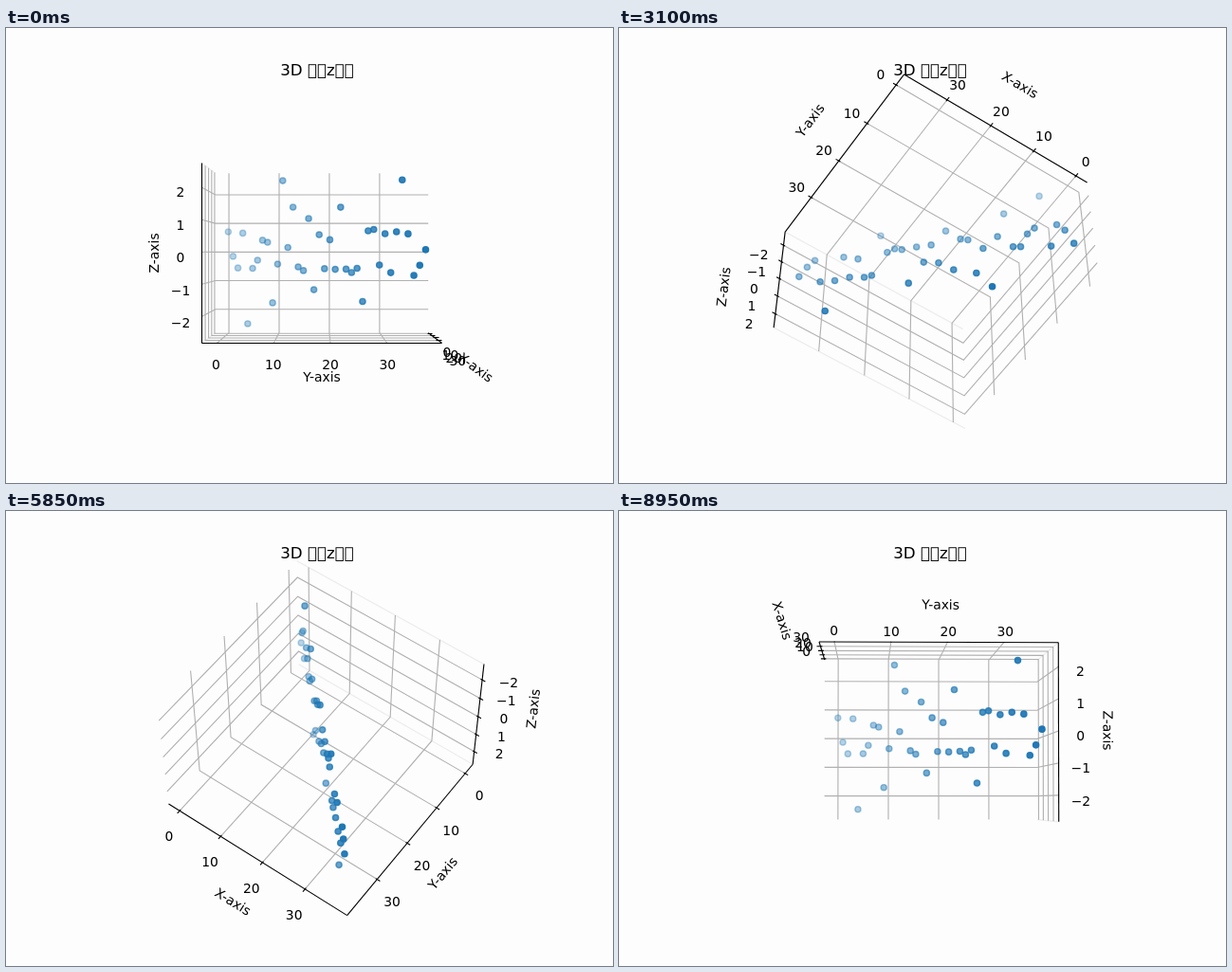
These frames come from a looping animation (640 px wide and 480 px high, 9000 ms). An HTML page with a canvas:

```html
<!DOCTYPE html>
<html lang="en">
<head>
<meta charset="utf-8">
<title>Rotating 3D scatter</title>
<style>
  html, body { margin: 0; width: 100%; height: 100%; overflow: hidden; background: #fdfdfd; }
  canvas { display: block; }
</style>
</head>
<body>
<canvas id="stage" width="640" height="480"></canvas>
<script>
const ctx = document.getElementById('stage').getContext('2d');

const FRAME_MS = 50, FRAMES = 180, STEP_DEG = 2;
const POINT = 100 / 72;                         // pixels per typographic point
const DISTANCE = 10, SCALE = 369.6 / 0.185;     // camera distance, pixels per projected unit
const ORIGIN = [333, 237.4];

const scores = [
  0.70, -0.15, -0.55, 0.65, -2.46, -0.56, -0.28, 0.40, 0.33, -1.72,
  -0.41, 2.40, 0.15, 1.50, -0.50, -0.62, 1.11, -1.25, 0.57, -0.55,
  0.40, -0.57, 1.46, -0.56, -0.67, -0.53, -1.60, 0.68, 0.72, -0.42,
  0.58, -0.66, 0.64, 2.28, 0.57, -0.74, -0.42, 0.07
];

// The box is centred on the world origin; half holds its half sizes.
const half = [4, 4, 3].map(side => side * 0.148813);
const delta = half.map(size => size * 0.16);
const dataCentre = [18.5, 18.5, -0.0355];
const dataHalf = [21.198, 21.198, 2.788];
const toWorld = (value, axis) => (value - dataCentre[axis]) / dataHalf[axis] * half[axis];

const axes = [
  { name: 'X-axis', ticks: [0, 10, 20, 30], side: 1 },
  { name: 'Y-axis', ticks: [0, 10, 20, 30], side: 0 },
  { name: 'Z-axis', ticks: [-2, -1, 0, 1, 2], side: 0 }
];
const points = scores.map((z, i) => [i, i, z].map(toWorld));

const dot = (a, b) => a[0] * b[0] + a[1] * b[1] + a[2] * b[2];
const replaced = (point, axis, value) => point.map((c, i) => i === axis ? value : c);
const pushedOut = (point, axis, amount) =>
  point.map((c, i) => i === axis ? c : c + (c < 0 ? -1 : 1) * amount * delta[i]);

function makeCamera(degrees) {
  const angle = degrees * Math.PI / 180;
  const s = Math.sin(angle), c = Math.cos(angle);   // elevation equals azimuth
  const right = [-s, c, 0], up = [-s * c, -s * s, c], toEye = [c * c, c * s, s];
  const project = p => {
    const depth = DISTANCE - dot(toEye, p);
    return [
      ORIGIN[0] + dot(right, p) / depth * SCALE,
      ORIGIN[1] - dot(up, p) / depth * SCALE,
      depth
    ];
  };
  const fromPole = Math.abs(c) < 1e-9;
  const highs = toEye.map((w, i) => fromPole && i < 2 ? true : w < -1e-9);
  return { project, highs };
}

function drawLine(path, color, width) {
  if (path.length === 2) {
    // Crisp pixels for straight horizontal and vertical lines.
    const [a, b] = path;
    if (Math.abs(a[0] - b[0]) < 0.01 || Math.abs(a[1] - b[1]) < 0.01) {
      path = path.map(p => [Math.floor(p[0]) + 0.5, Math.floor(p[1]) + 0.5]);
    }
  }
  ctx.beginPath();
  path.forEach(p => ctx.lineTo(p[0], p[1]));
  ctx.strokeStyle = color;
  ctx.lineWidth = width * POINT;
  ctx.stroke();
}

function drawText(text, x, y, baseline, angle = 0) {
  ctx.save();
  ctx.translate(x, y);
  ctx.rotate(angle);
  ctx.fillText(text, 0, baseline);
  ctx.restore();
}

function setFont(size) {
  ctx.font = `${size * POINT}px "DejaVu Sans", sans-serif`;
  ctx.fillStyle = '#000';
}

function drawTitle() {
  const em = 12 * POINT, left = 289.2, base = 50;
  setFont(12);
  ctx.textAlign = 'left';
  ctx.fillText('3D', left, base);
  ctx.fillText('z', left + 2.924 * em, base);
  ctx.strokeStyle = '#000';
  ctx.lineWidth = 0.056 * em;
  for (const x of [1.724, 2.324, 3.449, 4.049]) {   // missing-glyph boxes
    ctx.strokeRect(left + (x + 0.078) * em, base - 0.677 * em, 0.444 * em, 0.826 * em);
  }
}

function drawAxis(index, far, near, { project, highs }) {
  const { name, ticks, side } = axes[index];
  const start = replaced(far, side, near[side]);
  const end = replaced(start, index, near[index]);
  const [a, b] = [project(start), project(end)];
  drawLine([a, b], '#000', 0.8);

  let angle = Math.atan2(a[1] - b[1], b[0] - a[0]);
  if (angle > Math.PI / 2 + 1e-9) angle -= Math.PI;
  if (angle < -Math.PI / 2 + 1e-9) angle += Math.PI;
  const [labelX, labelY] = project(pushedOut(replaced(start, index, 0), index, 2.2547));
  drawText(name, labelX, labelY, 4, -angle);

  const tickStep = highs[side] ? delta[side] : -delta[side];
  for (const value of ticks) {
    const at = replaced(start, index, toWorld(value, index));
    const tickEnd = k => project(replaced(at, side, at[side] + k * tickStep));
    drawLine([tickEnd(0.1), tickEnd(-0.2)], '#000', 0.8);
    const [x, y] = project(pushedOut(at, index, 1.0372));
    drawText(String(value).replace('-', '\u2212'), x, y, 11);
  }
}

function drawGrid(index, far, near, project) {
  const first = (index + 1) % 3, second = (index + 2) % 3;
  for (const value of axes[index].ticks) {
    const corner = replaced(far, index, toWorld(value, index));
    const path = [
      replaced(corner, first, near[first]), corner, replaced(corner, second, near[second])
    ];
    drawLine(path.map(project), '#b0b0b0', 0.8);
  }
}

function drawPaneEdge(y, project) {
  const [hx, , hz] = half;
  const path = [[-hx, y, -hz], [hx, y, -hz], [hx, y, hz], [-hx, y, hz]];
  drawLine(path.map(project), '#eeeeee', 1);
}

function drawPoints(project) {
  const dots = points.map(project).sort((a, b) => b[2] - a[2]);
  const farthest = 1 / dots[0][2], nearest = 1 / dots[dots.length - 1][2];
  ctx.fillStyle = ctx.strokeStyle = '#1f77b4';
  ctx.lineWidth = POINT;
  for (const [x, y, depth] of dots) {
    ctx.globalAlpha = 1 - 0.7 * (nearest - 1 / depth) / (nearest - farthest);
    ctx.beginPath();
    ctx.arc(x, y, Math.sqrt(20) / 2 * POINT, 0, 2 * Math.PI);
    ctx.fill();
    ctx.stroke();
  }
  ctx.globalAlpha = 1;
}

function draw(time) {
  const camera = makeCamera(Math.floor(time / FRAME_MS) % FRAMES * STEP_DEG);
  const far = half.map((size, i) => camera.highs[i] ? size : -size);
  const near = far.map(c => -c);

  ctx.fillStyle = '#fdfdfd';
  ctx.fillRect(0, 0, 640, 480);
  drawPaneEdge(far[1], camera.project);
  axes.forEach((_, i) => drawGrid(i, far, near, camera.project));
  setFont(10);
  ctx.textAlign = 'center';
  axes.forEach((_, i) => drawAxis(i, far, near, camera));
  drawPoints(camera.project);
  drawTitle();
}

function tick() {
  draw(performance.now());
  requestAnimationFrame(tick);
}
tick();
</script>
</body>
</html>
```
